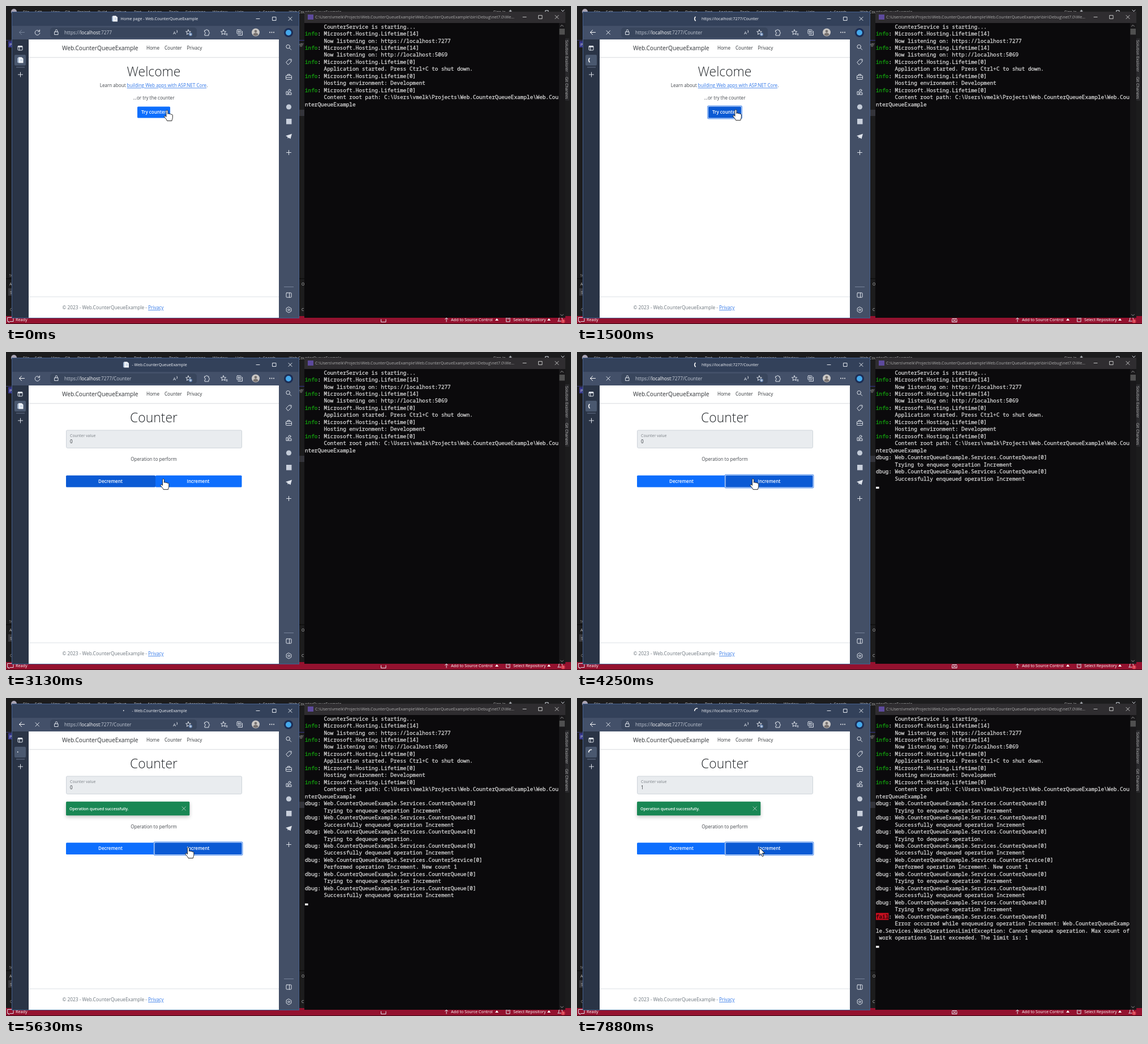
These frames come from a looping animation (998x561 px, 8 s). An HTML page:

```html
<!DOCTYPE html>
<html lang="en">
<head>
<meta charset="utf-8">
<title>Counter queue demo</title>
<style>
  html, body { margin: 0; width: 100%; height: 100%; overflow: hidden; background: #1c1c1d; }
  svg { display: block; width: 998px; height: 561px; }
  text { font-family: "Open Sans", "Noto Sans", sans-serif; white-space: pre; }
  .mono text {
    font-family: "Noto Sans Mono", "DejaVu Sans Mono", monospace; font-size: 9.34px;
    color: #d6d6d6; fill: currentColor; stroke: currentColor; stroke-width: .28;
  }
  .line { fill: none; stroke: #dfe4ec; stroke-width: 1; stroke-linecap: round; stroke-linejoin: round; }
</style>
</head>
<body>
<svg viewBox="0 0 998 561" xmlns="http://www.w3.org/2000/svg">
  <g id="still"></g>
  <g id="live"></g>
</svg>
<script>
const LOOP = 8000, STEP = 125;
const CLICKS = [750, 3500, 5500, 7375];
const LOADS = [2750, 5000, 6750];
const APP = 'Web.CounterQueueExample';
const HOST = 'https://localhost:7277';
const BLUE = [13, 110, 253], DEEP = [11, 90, 212];

// time, x, y of the pointer tip
const PATH = [
  [0, 284.5, 184], [250, 284.5, 184], [625, 280.5, 183], [2625, 280.5, 183],
  [2875, 258, 222], [3000, 260, 224], [3125, 278, 224], [3375, 311, 224],
  [5000, 311, 224], [5375, 322, 264], [LOOP, 322, 264]
];

const clamp = v => Math.max(0, Math.min(1, v));
const rect = (x, y, w, h, fill, extra = '') =>
  `<rect x="${x}" y="${y}" width="${w}" height="${h}" fill="${fill}" ${extra}/>`;
const line = (d, extra = '') => `<path class="line" d="${d}" ${extra}/>`;
const shape = (d, fill, extra = '') => `<path d="${d}" fill="${fill}" ${extra}/>`;
const dot = (x, y, r, fill) => `<circle cx="${x}" cy="${y}" r="${r}" fill="${fill}"/>`;
const ring = (x, y, r) => `<circle class="line" cx="${x}" cy="${y}" r="${r}"/>`;
const box = (x, y, w, h, r = 1) =>
  `<rect class="line" x="${x}" y="${y}" width="${w}" height="${h}" rx="${r}"/>`;
// y is the middle of the text line
const text = (x, y, s, size, fill, extra = '') =>
  `<text x="${x}" y="${(y + size * .36).toFixed(2)}" font-size="${size}" fill="${fill}" ${extra}>${s}</text>`;
const mid = 'text-anchor="middle"';
const star = (x, y, r) => {
  let d = '';
  for (let i = 0; i < 10; i++) {
    const a = i * Math.PI / 5 - Math.PI / 2, q = i % 2 ? r * .45 : r;
    d += `${i ? 'L' : 'M'}${(x + q * Math.cos(a)).toFixed(2)} ${(y + q * Math.sin(a)).toFixed(2)}`;
  }
  return line(d + 'Z');
};
const windowButtons = (xs, y, color) => {
  const [a, b, c] = xs, s = `style="stroke:${color}"`;
  return line(`M${a - 3} ${y}h6`, s) + line(`M${b - 3} ${y - 3}h6v6h-6z`, s) +
    line(`M${c - 3} ${y - 3}l6 6m0-6l-6 6`, s);
};

function ide() {
  const menu = { 30: 'File', 51: 'Edit', 80: 'View', 104: 'Git', 126: 'Project', 162: 'Build', 191: 'Debug',
    226: 'Test', 250: 'Analyze', 288: 'Tools', 317: 'Extensions', 365: 'Window', 405: 'Help',
    454: 'Search', 500: APP, 861: 'Sign in' };
  let s = rect(0, 0, 998, 561, '#1c1c1d') + dot(14, 10, 5, '#a9a4b4');
  for (const x in menu) s += text(x, 10, menu[x], 7, '#c4c4c4');
  s += line('M448 10a2.5 2.5 0 1 0 .1 0') + line('M891 7v4m-2-2h4') +
    line('M924 11h6M953 8h5v4h-5zM981 7l5 5m0-5l-5 5');
  s += rect(0, 60, 11, 1, '#3b3b78') + rect(4, 62, 7, 11, '#35358a') + text(6, 68, 'P', 7, '#ddd');
  s += text(515, 67, 'ogr', 7, '#aaa') + rect(518, 60, 10, 1, '#35358a');
  s += rect(518, 183, 10, 11, '#34343a') + rect(0, 480, 528, 2, '#111');
  s += text(5, 475, '10', 7, '#aaa') + text(6, 490, 'A', 7, '#bbb') + rect(4, 498, 8, 13, '#39393d') +
    text(7, 505, 'S', 7, '#bbb') + text(7, 535, 'O', 7, '#999') +
    text(522, 490, 'O', 7, '#bbb') + text(522, 535, 'C', 7, '#bbb');
  const side = (y, label) => `<text transform="translate(987.5 ${y}) rotate(90)" font-size="7" fill="#b5b5b5">${label}</text>`;
  s += rect(988, 57, 7, 110, '#29292c') + side(60, 'Solution Explorer') + side(125, 'Git Changes');
  s += rect(0, 547, 998, 13, '#94122f') + rect(0, 560, 998, 1, '#3a0d18');
  s += line('M3 549.5h10v7h-6l-2 2v-2h-2z') + text(17, 553.5, 'Ready', 7.2, '#fff');
  s += line('M778 557v-7m-2.5 2.5l2.5-2.5 2.5 2.5') + text(786, 553.5, 'Add to Source Control', 7.2, '#fff') +
    shape('M864 555l3-4 3 4z', '#fff');
  s += line('M884 550h6v7h-6zM886 552h2') + text(896, 553.5, 'Select Repository', 7.2, '#fff') +
    shape('M956 555l3-4 3 4z', '#fff');
  s += line('M975 556h9l-1.5-2v-2a3 3 0 0 0-6 0v2z') + dot(984, 556, 3.5, '#d83b4c') +
    text(984, 556, '1', 5, '#fff', mid);
  return s;
}

function terminal() {
  return rect(527, 10, 461, 540, '#0b0a0c') + rect(527, 10, 461, 20, '#2f2d30') +
    rect(533, 15, 10, 9, '#5d4a9c') +
    text(546, 19.5, `C:\\Users\\vmelk\\Projects\\${APP}\\${APP}\\bin\\Debug\\net7.0\\We...`, 7.12, '#adadad') +
    windowButtons([916, 944, 973], 19.5, '#c4c4c4') +
    rect(977, 30, 11, 520, '#19181a') + rect(977.5, 40, 9.5, 10.5, '#505050') +
    line('M979.5 36l2.5-2.5 2.5 2.5M979.5 544l2.5 2.5 2.5-2.5', 'style="stroke:#999"');
}

function browser() {
  let s = rect(10.5, 10.5, 507, 540, '#33415a', 'stroke="#45608f"');
  s += rect(11, 35, 506, 24, '#435069') + rect(482, 35, 35, 515, '#434f66') + rect(11, 59, 29, 491, '#2a3446');
  s += rect(78, 38, 259, 18, '#39465d', 'rx="5"');
  s += windowButtons([445, 474, 502], 22.5, '#e6eaf0');
  // toolbar
  s += line('M86 45.5h6v5h-6zM87.3 45.5v-2a1.7 1.7 0 0 1 3.4 0v2');
  s += text(295, 47, 'A', 8, '#dfe4ec') + line('M302 43a4 4 0 0 1 0 4') +
    star(322, 46.5, 4.6) + dot(326, 50, 3, '#5f7fae') + line('M324.5 50h3m-1.5-1.5v3');
  s += line('M351 43h2a1.5 1.5 0 0 1 3 0h2v3a1.5 1.5 0 0 1 0 3v3h-7v-3a1.5 1.5 0 0 0 0-3z');
  s += star(384, 46.5, 4.8) + line('M388 49h3m-2 2h2');
  s += box(408, 42, 7, 7) + line('M410 51.5h7.5v-7M411.5 43.5v4m-2-2h4');
  s += dot(441, 46.5, 7, '#cbc8c6') + dot(441, 44.5, 2.3, '#77716f') +
    shape('M436.5 51a4.5 3.8 0 0 1 9 0a7 7 0 0 1-9 0z', '#77716f');
  for (const x of [466, 469.5, 473]) s += dot(x, 46.5, .9, '#fff');
  s += dot(499, 47, 8, '#1c2d55') + dot(499, 47, 5, '#45a9ec');
  // right sidebar
  s += ring(498.2, 71.7, 3.3) + line('M500.7 74.2l3 3');
  s += line('M495 99l5-5h4v4l-5.5 5.5zM502 96h.1');
  s += box(494.5, 122.5, 10, 7) + line('M497.5 122.5v-2h4v2M494.5 126h10');
  s += ring(501, 149, 2) + line('M495 156v-5h3v5zM499 156v-3h5v3z');
  s += dot(499.5, 178, 4.6, '#c3cbd8') + rect(495, 199, 9.5, 9.5, '#c9d0dc');
  s += shape('M494 229l11-3.5-2.5 9-3-2.3-1.8 1.6-.3-2.8z', '#dfe4ec');
  s += line('M495.5 258.5h8m-4-4v8') + rect(491, 495, 17, 1, '#77839a');
  s += box(495, 506, 9, 8) + line('M500.5 506v8');
  s += ring(499.5, 536, 1.6) + line('M499.5 531l4.3 2.5v5l-4.3 2.5-4.3-2.5v-5z');
  // vertical tabs
  s += box(21, 70.5, 8, 7.5) + rect(21, 70.5, 8, 2.3, '#dfe4ec') + line('M23.8 72v6');
  s += rect(15, 86, 20, 19, '#4a586f', 'rx="2"') + rect(18, 107.5, 15, 1, '#68758b') + line('M21.5 121h8m-4-4v8');
  // page frame
  s += rect(40, 59, 442, 491, '#fff') + rect(40, 90, 442, 1, '#e2e4e7') + rect(40, 91, 442, 1, '#f4f5f6');
  s += text(99, 74.5, APP, 10.2, '#2c2f33') + text(248, 74.5, 'Home', 8.1, '#33373b') +
    text(280, 74.5, 'Counter', 8.1, '#33373b') + text(319.5, 74.5, 'Privacy', 8.1, '#33373b');
  s += rect(40, 512.5, 442, 1, '#dee2e6');
  s += text(99.5, 532, `© 2023 - ${APP} - <tspan fill="#2f76e8" text-decoration="underline">Privacy</tspan>`, 8.3, '#6c757d');
  return s;
}

const sheet = (x, y) =>
  shape(`M${x - 5} ${y - 3.5}l2-1.8h5l3 2.5v7.8h-8l-2-1z`, '#eef2f7') +
  shape(`M${x - 3} ${y - 5}v9.5h-2v-8z`, '#9fb4cf') + line(`M${x} ${y - 1}h3m-3 2h3`, 'style="stroke:#9db7d8;stroke-width:.7"');

function spinner(x, y, e) {
  const from = 180 - Math.max(0, e - 500) * .2, to = from + 6 + 90 * clamp((e - 125) / 375);
  const at = a => `${(x + 4.3 * Math.cos(a * Math.PI / 180)).toFixed(2)} ${(y + 4.3 * Math.sin(a * Math.PI / 180)).toFixed(2)}`;
  return line(`M${at(from)}A4.3 4.3 0 0 1 ${at(to)}`, 'style="stroke:#fff;stroke-width:1.6"');
}

function chrome(page, loading, e) {
  const going = loading && e >= 250, away = page > 0 || going;
  const title = going ? `${HOST}/Counter` : (page ? '- ' : 'Home page - ') + APP;
  const iconX = !page && !going ? 192 : 212;
  let s = text(iconX + (going ? 8 : 10.5), 22.5, title, 7.06, '#f2f4f8', 'font-weight="500"');
  s += loading ? spinner(iconX, 22.5, e) + spinner(25, 95.5, e) : sheet(iconX, 22.5) + sheet(25.5, 95.5);
  s += line('M32.5 46.5h-9m4-4l-4 4 4 4', `style="stroke:${away ? '#fff' : '#77849b'}"`);
  s += loading ? line('M52 43.5l6.5 6.5m0-6.5l-6.5 6.5')
    : line('M59 44.5a4.3 4.3 0 1 0 .8 3M59.5 42v3h-3');
  s += text(103, 47, `<tspan fill="#c3cad6">https://</tspan>localhost<tspan fill="#c3cad6">:7277${away ? '/Counter' : ''}</tspan>`, 8.27, '#fff');
  return s;
}

function button(x, y, w, h, dark, focus, label, labelX) {
  const fill = `rgb(${BLUE.map((c, i) => Math.round(c + (DEEP[i] - c) * dark))})`;
  const halo = (g, color) => rect(x - g, y - g, w + 2 * g, h + 2 * g, color, `rx="${2 + g / 2}"`);
  return (focus ? halo(2, '#5b95ee') + halo(1, '#cfe0fb') : '') +
    rect(x, y, w, h, fill, 'rx="1.6"') + text(labelX, y + h / 2, label, 8, '#fff', mid + ' font-weight="600"');
}

function content(t, page, loading) {
  const fade = (on, off = Infinity) => clamp((t - on) / 150) * (1 - clamp((t - off) / 150));
  const heading = s => text(261, 115.5, s, 22.9, '#24282c', mid + ' font-weight="300"');
  if (!page) {
    return heading('Welcome') +
      text(261, 140.5, 'Learn about <tspan fill="#2f76e8" text-decoration="underline">building Web apps with ASP.NET Core</tspan>.', 8.1, '#43474c', mid) +
      text(261, 162, '...or try the counter', 8.1, '#43474c', mid) +
      button(232, 177.5, 58, 20, loading ? 1 : fade(50), loading, 'Try counter', 261);
  }
  const shift = page > 1 ? 37.5 : 0, y = 217.7 + shift;
  let s = heading('Counter') + rect(106.5, 138, 310, 31.3, '#e9ecef', 'rx="2" stroke="#ced4da"') +
    text(113, 147.5, 'Counter value', 6.95, '#7c8187') + text(113, 158.5, page > 2 ? 1 : 0, 8.1, '#2c3034');
  if (shift) {
    s += rect(106, 182.7, 218.3, 24.6, '#198754', 'rx="1.5" style="filter:drop-shadow(0 3px 3px rgba(0,0,0,.22))"') +
      text(112, 195, 'Operation queued successfully.', 6.95, '#fff', 'font-weight="600"') +
      line('M311 191.8l6.4 6.4m0-6.4l-6.4 6.4', 'style="stroke:#a9c9b8"');
  }
  s += text(261, 189.5 + shift, 'Operation to perform', 8.1, '#43474c', mid);
  const inc = loading ? 1 : fade([3125, 5325, 6800][page - 1]);
  const left = loading ? 262.5 : 264;
  s += button(106, y, 158, 20.8, page === 1 ? fade(2800, 3125) : 0, false, 'Decrement', 184.5);
  return s + button(left, y, 416.5 - left, 20.8, inc, loading, 'Increment', 339.5);
}

const host = (id, msg) => ['info', `Microsoft.Hosting.Lifetime[${id}]`, msg];
const queue = (msg, level = 'dbug', name = 'Queue') =>
  [level, `${APP}.Services.Counter${name}[0]`, msg];
const enqueue = [queue('Trying to enqueue operation Increment'), queue('Successfully enqueued operation Increment')];
const LOG = [
  [0, ['', '', 'CounterService is starting...'],
    host(14, `Now listening on: ${HOST}`), host(14, 'Now listening on: http://localhost:5069'),
    host(0, 'Application started. Press Ctrl+C to shut down.'), host(0, 'Hosting environment: Development'),
    host(0, `Content root path: C:\\Users\\vmelk\\Projects\\${APP}\\${APP}`)],
  [3625, ...enqueue],
  [5000, queue('Trying to dequeue operation.'), queue('Successfully dequeued operation Increment'),
    queue('Performed operation Increment. New count 1', 'dbug', 'Service')],
  [5500, ...enqueue],
  [7500, enqueue[0], queue(`Error occurred while enqueueing operation Increment: ${APP}.Services.WorkOperationsLimitException: ` +
    'Cannot enqueue operation. Max count of work operations limit exceeded. The limit is: 1', 'fail')]
];

function output(t) {
  let s = '', row = 0;
  const rowY = () => 36.2 + 12.47 * row;
  const print = str => { s += text(528, rowY(), str, 9.34, 'currentColor'); row++; };
  for (const [when, ...entries] of LOG) {
    if (t < when) break;
    for (const [level, source, msg] of entries) {
      if (level === 'fail') s += rect(528, rowY() - 6.2, 22.4, 12.4, '#c50f1f');
      const color = { info: '#13a10e', fail: '#240306' }[level] || 'inherit';
      if (level) print(`<tspan style="color:${color}">${level}</tspan>: ${source}`);
      const full = '      ' + msg;
      for (let i = 0; i < full.length; i += 80) print(full.slice(i, i + 80));
    }
  }
  if (t >= LOG[1][0]) s += rect(528, rowY() + 2, 5.6, 3.4, '#f2f2f2');
  return `<g class="mono">${s}</g>`;
}

function pointer(t, page) {
  const i = PATH.findIndex(p => p[0] > t);
  const [t0, x0, y0] = PATH[i - 1], [t1, x1, y1] = PATH[i];
  const k = (t - t0) / (t1 - t0), u = k * k * (3 - 2 * k);
  const x = x0 + (x1 - x0) * u, y = y0 + (y1 - y0) * u;
  const top = [177, 218, 255, 255][page];
  const hand = t < 7625 && y >= top && y <= top + 21;
  const d = hand
    ? 'M-1.6 1.2C-1.6-.6 1.4-.6 1.4 1.2V6.5C1.6 5.4 4.2 5.4 4.4 6.9C4.9 6 7 6.2 7.2 7.6C7.8 7 9.7 7.2 9.8 8.8V12.6C9.8 15 8.6 16 8.4 18.6H0C-.4 16.6-3 14-4.8 11.8C-5.6 10.6-4 9.2-2.8 10.2L-1.6 11.4Z'
    : 'M0 0V13.6L3.2 10.7 5.3 15.6 7.5 14.6 5.4 9.8H9.8Z';
  return shape(d, '#fff', `stroke="#111" stroke-width=".9" transform="translate(${x.toFixed(2)} ${y.toFixed(2)})"`);
}

function taskIcon(n) {
  const busy = ![0, 1, 5].includes(n % 8);
  return line('M662.5 553v4.5h8.5v-4.5') + (busy ? line('M663 551.5h7.5M664.5 553l4.5 3m0-3l-4.5 3') : '');
}

const still = document.getElementById('still'), live = document.getElementById('live');
still.innerHTML = ide() + terminal() + browser();

let shown = -1;
function draw(now) {
  const n = Math.floor((now % LOOP) / STEP);
  if (n === shown) return;
  shown = n;
  const t = n * STEP;
  const page = LOADS.filter(v => v <= t).length;
  const e = t - CLICKS[page], loading = e >= 0;
  live.innerHTML = chrome(page, loading, e) + content(t, page, loading) +
    output(t) + taskIcon(n) + pointer(t, page);
}

const start = performance.now();
function tick() {
  draw(performance.now() - start);
  requestAnimationFrame(tick);
}
tick();
</script>
</body>
</html>
```
